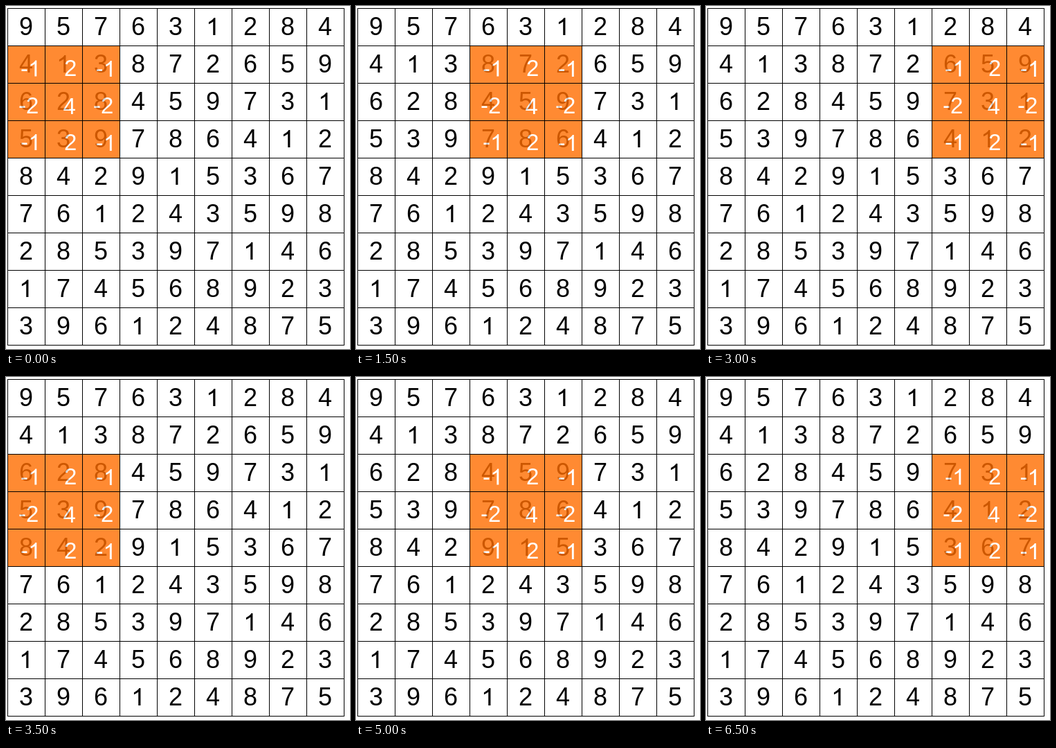
Recreate the animation shown at these times as an HTML page with a canvas. Size 497 by 495 pixels, loop 7 s.

```html
<!DOCTYPE html>
<html lang="en">
<head>
<meta charset="utf-8">
<title>Sliding kernel over a number grid</title>
<style>
  html, body { margin: 0; width: 100%; height: 100%; overflow: hidden; background: #fff; }
  canvas { display: block; }
</style>
</head>
<body>
<canvas id="stage" width="497" height="495"></canvas>
<script>
const W = 497, H = 495;
const CELL = 54, LEFT = 2, TOP = 3;
const STEP_MS = 500, COLS = 7, STEPS = 14;

const ROWS = [
  "957631284", "413872659", "628459731",
  "539786412", "842915367", "761243598",
  "285397146", "174568923", "396124875"
];

// Each label: text, x and baseline relative to the kernel's corner.
const LABELS = [
  ["-1", 19, 44.5], ["2", 82, 44], ["-1", 127.5, 45],
  ["-2", 16, 98], ["4", 80.5, 99], ["-2", 124, 98],
  ["-1", 19, 151], ["2", 82, 151], ["-1", 127.5, 152]
];

const ctx = document.getElementById("stage").getContext("2d");

// A numeral one without a foot, on a 2048-unit em.
const one = new Path2D("M763 0H583V1147Q518 1085 412 1023T223 930V1104" +
  "Q374 1175 487 1276T647 1472H763Z");

function put(g, text, x, y, size) {
  g.font = size + "px 'Liberation Sans', Arial, sans-serif";
  for (const ch of text) {
    if (ch === "1") {
      const k = size / 2048;
      g.save();
      g.translate(x, y);
      g.scale(k, -k * 0.97);
      g.fill(one);
      g.restore();
    } else {
      g.fillText(ch, x, y);
    }
    x += g.measureText(ch).width;
  }
}

function grid(g, n, x, y) {
  g.fillStyle = "#000";
  for (let i = 0; i <= n; i++) {
    g.fillRect(x + i * CELL, y, 1, n * CELL + 1);
    g.fillRect(x, y + i * CELL, n * CELL + 1, 1);
  }
}

function layer(w, h, paint) {
  const c = document.createElement("canvas");
  c.width = w;
  c.height = h;
  paint(c.getContext("2d"));
  return c;
}

const board = layer(W, H, g => {
  g.fillStyle = "#fff";
  g.fillRect(0, 0, W, H);
  grid(g, 9, LEFT, TOP);
  ROWS.forEach((row, r) => [...row].forEach((d, c) =>
    put(g, d, 19 + c * CELL, 42 + r * CELL, 36)));
});

const kernel = layer(3 * CELL + 1, 3 * CELL + 1, g => {
  g.fillStyle = "#ff6d00";
  g.fillRect(0, 0, 3 * CELL + 1, 3 * CELL + 1);
  grid(g, 3, 0, 0);
  g.fillStyle = "#fff";
  for (const [text, x, y] of LABELS) put(g, text, x, y, 33);
});

function draw(now) {
  const step = Math.floor(now / STEP_MS) % STEPS;
  const col = step % COLS;
  const row = 1 + Math.floor(step / COLS);
  ctx.globalAlpha = 1;
  ctx.drawImage(board, 0, 0);
  ctx.globalAlpha = 0.8;
  ctx.drawImage(kernel, LEFT + col * CELL, TOP + row * CELL);
}

const start = performance.now();
function tick() {
  draw(performance.now() - start);
  requestAnimationFrame(tick);
}
tick();
</script>
</body>
</html>
```
